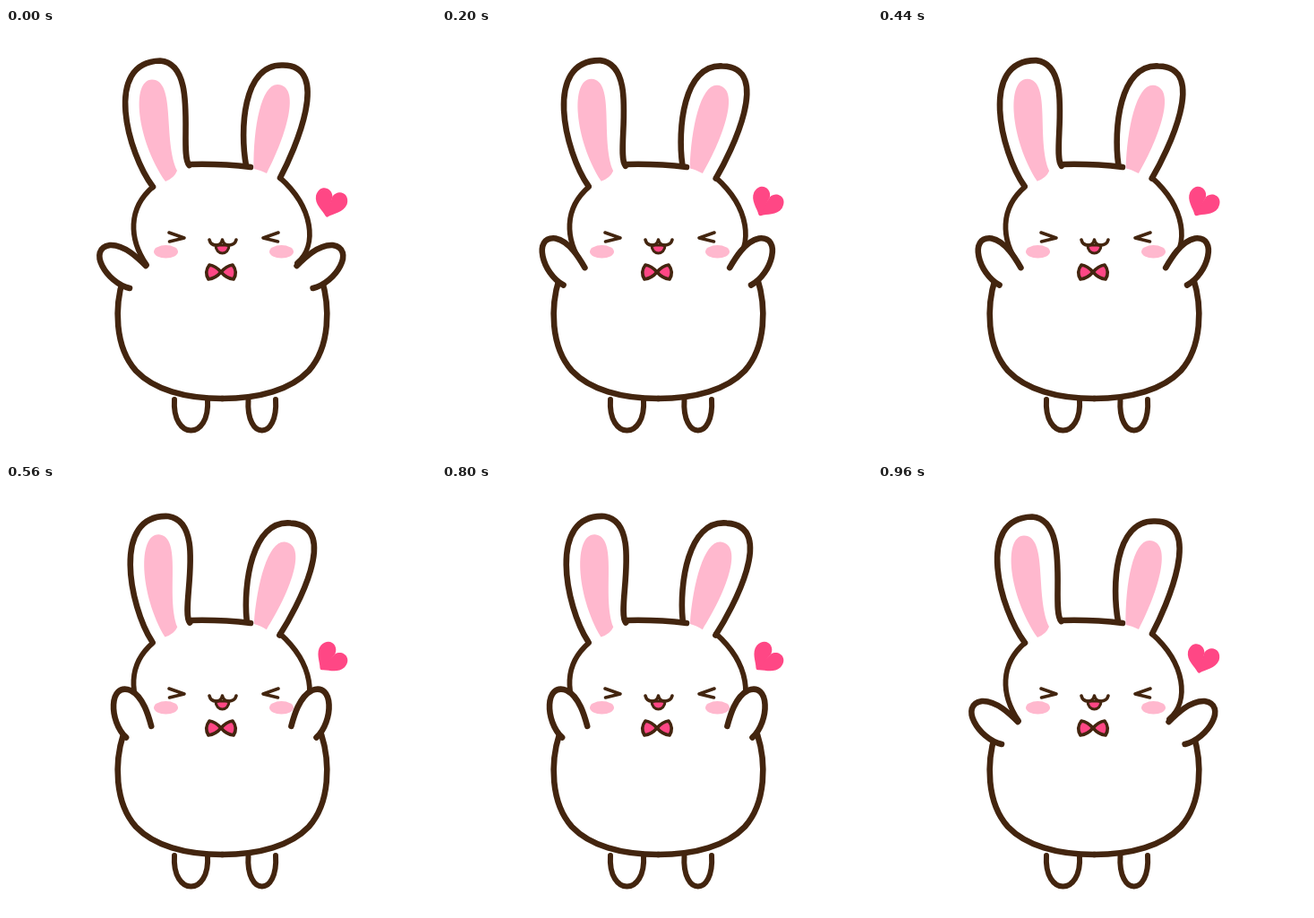
An HTML page with a canvas for the animation above (1000 ms loop, 480 by 477 pixels).

```html
<!DOCTYPE html>
<html lang="en">
<head>
<meta charset="utf-8">
<title>Happy bunny</title>
<style>
  html, body { margin: 0; width: 100%; height: 100%; overflow: hidden; background: #fff; }
  canvas { display: block; width: 480px; height: 477px; }
</style>
</head>
<body>
<canvas id="stage" width="480" height="477"></canvas>
<script>
const ctx = document.getElementById('stage').getContext('2d');
const BROWN = '#43250f', PINK = '#ffb8ce', HOT = '#ff4785';
const STEP = 40, LOOP = 1000, SWING_STEPS = 3;

function shape(d, { fill, width }) {
  const path = new Path2D(d);
  if (fill) {
    ctx.fillStyle = fill;
    ctx.fill(path);
  }
  if (width) {
    ctx.strokeStyle = BROWN;
    ctx.lineWidth = width;
    ctx.stroke(path);
  }
}

const line = (d, width = 6.6) => shape(d, { width });

function placed(x, y, degrees, draw) {
  ctx.save();
  ctx.translate(x, y);
  ctx.rotate(degrees * Math.PI / 180);
  draw();
  ctx.restore();
}

const turned = (x, y, degrees, draw) => placed(x, y, degrees, () => {
  ctx.translate(-x, -y);
  draw();
});

// Draws once as is and once mirrored about a vertical axis
function bothSides(axis, draw) {
  draw();
  ctx.save();
  ctx.translate(2 * axis, 0);
  ctx.scale(-1, 1);
  draw();
  ctx.restore();
}

function foot(left, right) {
  line(`M${left},414 C${left - 3},460 ${right + 3},460 ${right},414`, 6);
}

function body() {
  foot(188, 225);
  foot(270.5, 301);
  bothSides(241.5, () => line('M131,279 C121,310 121,355 145,382 C165,403 200,413 242,413'));
  line('M164,177 C136,201 137,235 157,264', 5.8);
  line('M306,167 C343,200 348,242 325,262', 5.8);
  line('M205,152 Q240,151 273,155');
}

function face() {
  bothSides(243, () => {
    shape('M165,249.3 a13.5,7.2 0 1 1 27,0 a13.5,7.2 0 1 1 -27,0', { fill: PINK });
    line('M182,228 L199,234 L182.5,238', 3.6);
  });
  shape('M234,242 C234,254 249,254 249,242 Z', { fill: HOT, width: 3 });
  line('M227,236 C229,244 240,244 241.5,236 C243,244 255,244 257,236', 3.6);
  bothSides(240, () =>
    shape('M240,272 Q234,265 227,264 Q221,272 226,280 Q234,279 240,272 Z', { fill: HOT, width: 3.6 }));
}

function ears(k) {
  turned(184, 163, 2.1 * k, () => {
    shape('M178,171 C146,125 139,58 163,57.5 C190,58 175,125 191,159 Q188,167 178,171', { fill: PINK });
    line('M164,177 C136,140 108,38 172,36.5 C217,40 192,140 204.5,153');
  });
  turned(288, 160, 2.4 * k, () => {
    shape('M276.5,157 C276,110 285,63 303,63 C330,64 313,120 291,162 Q283,158 276.5,157', { fill: PINK });
    line('M268,153 C261,115 264,41 308,41.5 C365,40 322,137 306,167');
  });
}

function arms(k) {
  bothSides(240.3, () => turned(150, 279, 15 * k, () =>
    shape('M138,290 C112,284 90,246 116,242 C132,241 148,257 156,265', { fill: '#fff', width: 6.6 })));
}

function heart(k) {
  placed(362.5, 194.5, 16 + 13.5 * k, () => bothSides(0, () =>
    shape('M0,-7 C3,-17 18,-17 18,-3 C17,7 6,11 1.5,16 Q0,17 -1,16 Z', { fill: HOT })));
}

function render(now) {
  // Triangle wave: 0 1 2 3 2 1 ...
  const phase = Math.floor((now % LOOP) / STEP) % (2 * SWING_STEPS);
  const k = SWING_STEPS - Math.abs(SWING_STEPS - phase);
  ctx.fillStyle = '#fff';
  ctx.fillRect(0, 0, 480, 477);
  ctx.lineCap = ctx.lineJoin = 'round';
  body();
  face();
  ears(k);
  arms(k);
  heart(k);
}

let start;
function tick(now) {
  start ??= now;
  render(now - start);
  requestAnimationFrame(tick);
}
render(0);
requestAnimationFrame(tick);
</script>
</body>
</html>
```
